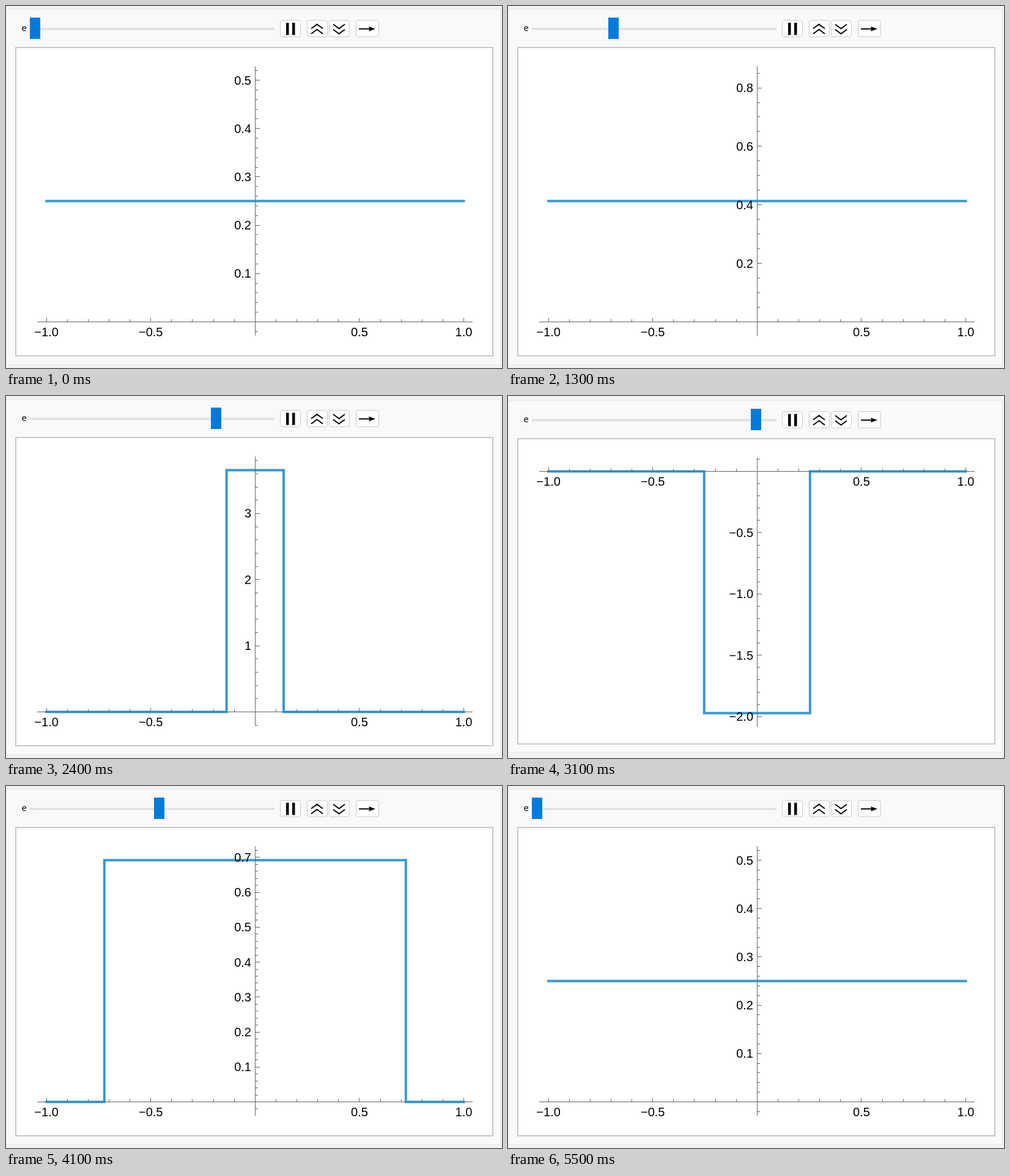
An HTML page for the animation above (6000 ms loop, 811 by 593 pixels).

```html
<!DOCTYPE html>
<html lang="en">
<head>
<meta charset="utf-8">
<title>Animated density plot</title>
<style>
  html, body { margin: 0; width: 100%; height: 100%; overflow: hidden; background: #f2f2f2; }
  svg { display: block; width: 811px; height: 593px; }
  .panel { fill: #f9f9f9; stroke: #e5e5e5; }
  .frame { fill: #fff; stroke: #c8c8c8; stroke-width: 2; }
  .track { fill: #f0f0f0; stroke: #d3d3d3; }
  .thumb { fill: #007bdc; }
  .button { fill: #fff; stroke: #cbcbcb; }
  .icon { fill: none; stroke: #000; stroke-width: 2; }
  .name { font: 15px "Open Sans", sans-serif; }
  .axes { fill: none; stroke: #666; shape-rendering: crispEdges; }
  .curve { fill: none; stroke: rgb(27 135 195 / .85); stroke-width: 4; stroke-linecap: square; }
  .labels { font: 20px "Liberation Sans", Arial, sans-serif; }
  .x { text-anchor: middle; }
  .y { text-anchor: end; }
</style>
</head>
<body>
<svg viewBox="0 0 811 593">
  <rect class="panel" id="panel" x=".5" width="808"/>
  <g id="controls">
    <text class="name" x="25.6" y="41">e</text>
    <rect class="track" x="39.5" y="36.5" width="399" height="2"/>
    <rect class="thumb" id="thumb" y="19" width="17" height="35"/>
    <g class="button">
      <rect x="448.5" y="23.5" width="33" height="27" rx="3.5"/>
      <rect x="492.5" y="23.5" width="33" height="27" rx="3.5"/>
      <rect x="528.5" y="23.5" width="33" height="27" rx="3.5"/>
      <rect x="572.5" y="23.5" width="37" height="27" rx="3.5"/>
    </g>
    <path d="M458 27.5h4.5v20H458zM468 27.5h4.5v20H468zM593 33.5l11 4-11 4 1.5-4z"/>
    <path class="icon" d="M499 37l9.5-7 9.5 7M499 45.5l9.5-7 9.5 7M535 30l9.5 7 9.5-7M535 38.5l9.5 7 9.5-7M577 37.5h19"/>
  </g>
  <rect class="frame" id="frame" x="16" width="780"/>
  <g id="plot">
    <path class="axes" id="axes"/>
    <path class="curve" id="curve"/>
    <g class="labels" id="labels"></g>
  </g>
</svg>
<script>
const $ = id => document.getElementById(id);
const set = (id, attrs) => {
  for (const key in attrs) $(id).setAttribute(key, attrs[key]);
};

const MAX_E = 1.2, LEAD = 0.09, PEAK = 24.5;
const X0 = 407.3, UNIT_X = 341.2;
const TOP = 99, BOTTOM = 540, SPAN = 396;

// Rests at zero, climbs to the peak and returns in 100 ms steps.
function sliderAt(step) {
  const k = Math.min(step - 5, 54 - step);
  return k < 0 ? 0 : MAX_E * (k + LEAD) / (PEAK + LEAD);
}

// Smallest 1-2-5 step giving at most eight divisions.
function tickStep(range) {
  for (let p = 0.1; ; p *= 10)
    for (const m of [1, 2, 5])
      if (range <= 8 * m * p) return { size: m * p, parts: m === 2 ? 4 : 5 };
}

function ticks(lo, hi) {
  const { size, parts } = tickStep(hi - lo);
  const minor = size / parts, list = [];
  for (let i = Math.ceil(lo / minor); i * minor <= hi; i++)
    if (i) list.push({
      v: i * minor,
      major: i % parts === 0,
      text: (i * minor).toFixed(size < 1 ? 1 : 0).replace("-", "\u2212")
    });
  return list;
}

const label = (cls, x, y, text) =>
  `<text class="${cls}" x="${x}" y="${y.toFixed(2)}">${text}</text>`;

function draw(e) {
  const w = 2 - 2 * e, h = 0.5 / w;
  const flat = w > 1, neg = w < 0;
  const high = flat ? 2 * h : Math.abs(h);
  const y0 = neg ? 121.5 : 517.5;
  const sx = v => X0 + v * UNIT_X;
  const sy = v => y0 - v * SPAN / high;
  const near = -0.0556 * high, far = 1.0535 * high;

  let axes = `M51 ${y0}H763M407.5 ${TOP}V${BOTTOM}`, text = "", highest = BOTTOM;
  for (const t of ticks(-1.04, 1.04)) {
    const x = Math.floor(sx(t.v)) + 0.5;
    axes += `M${x} ${y0}v${t.major ? -7 : -5}`;
    if (t.major) text += label("x", sx(t.v), y0 + 23.7, t.text);
  }
  for (const t of neg ? ticks(-far, -near) : ticks(near, far)) {
    const y = sy(t.v);
    axes += `M407.5 ${Math.floor(y) + 0.5}h${t.major ? 7.5 : 4.5}`;
    if (!t.major) continue;
    text += label("y", 401, y + 7, t.text);
    highest = Math.min(highest, y);
  }

  // A label close to the top edge makes the whole panel taller.
  const grow = neg ? 0 : Math.max(0, 110.3 - highest);
  const half = Math.round(grow / 2);
  const top = neg ? 2 : -half;
  const low = Math.floor(grow / 2);
  set("panel", { y: 5.5 + top, height: 582 - top + (neg ? -4 : low) });
  set("frame", { y: 68 + top, height: 505 - top + (neg ? -3 : low) });
  set("controls", { transform: `translate(0 ${top})` });
  set("plot", { transform: `translate(0 ${neg ? 2 : half})` });
  set("thumb", { x: 39 + Math.floor(382 * e / MAX_E) });

  const a = Math.abs(w), y = sy(h);
  set("axes", { d: axes });
  set("curve", {
    d: flat
      ? `M${sx(-1)} ${y}H${sx(1)}`
      : `M${sx(-1)} ${y0}H${sx(-a)}V${y}H${sx(a)}V${y0}H${sx(1)}`
  });
  $("labels").innerHTML = text;
}

let shown = -1;
function tick() {
  const step = Math.floor(performance.now() % 6000 / 100);
  if (step !== shown) draw(sliderAt(shown = step));
  requestAnimationFrame(tick);
}
tick();
</script>
</body>
</html>
```
